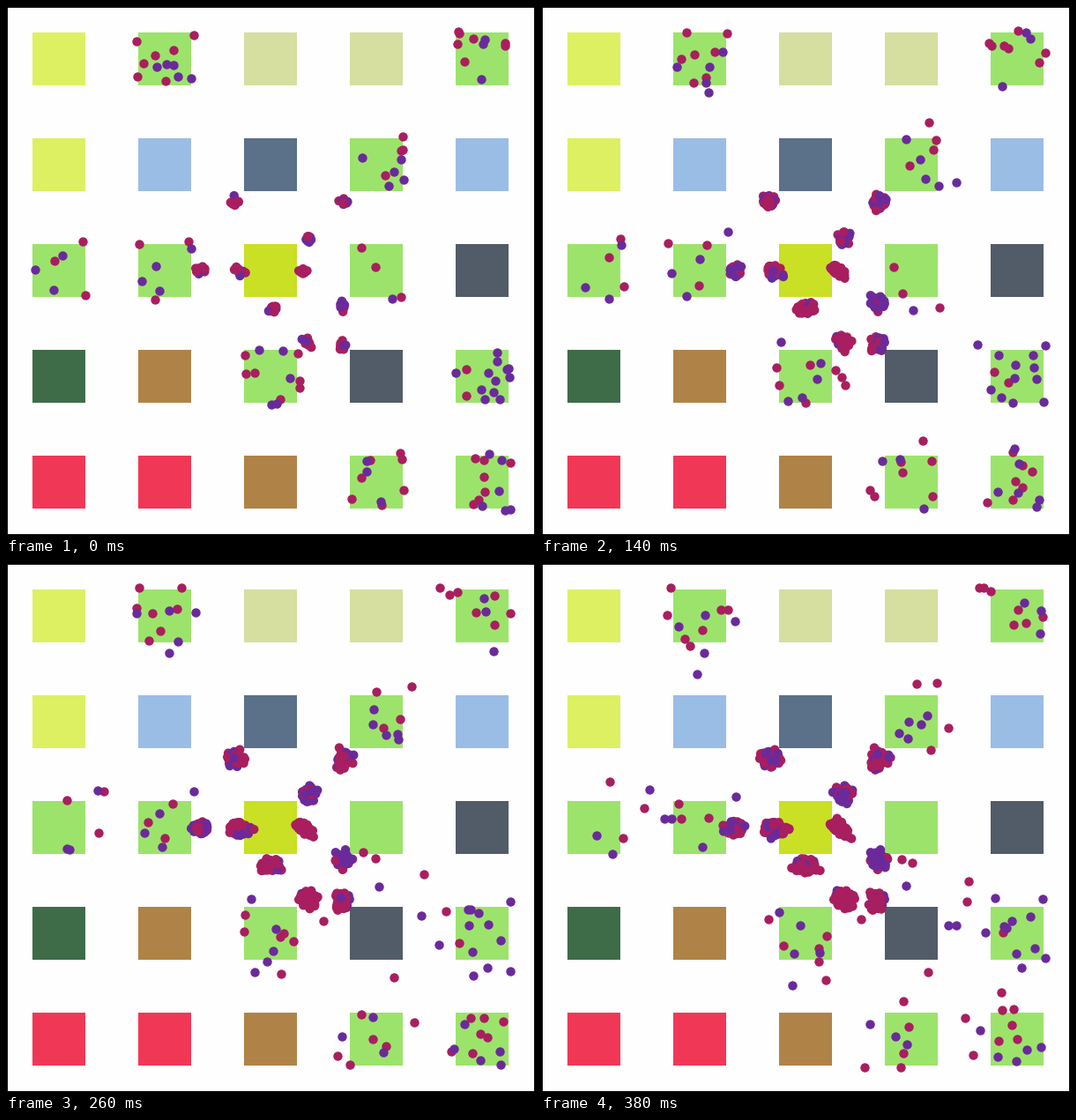
Write a matplotlib script that moves like this. It is 600 by 600 pixels and loops after 0.4 s.

```python
import math
import random

import numpy as np
import matplotlib.pyplot as plt
from matplotlib.animation import FuncAnimation
from matplotlib.patches import Rectangle

SIZE, DPI = 600, 100
FRAMES, INTERVAL = 20, 20
CELL, TILE = 120, 60
LOW, HIGH = 28, 572          # walkers stay inside these bounds
RED, PURPLE = "#a91e5f", "#6b2a9b"
DOT = (10.4 * 72 / DPI) ** 2

TILES = {"L": "#ddf062", "G": "#9ce36b", "P": "#d6dea0", "B": "#9abde6",
         "S": "#5b7089", "Y": "#c9e024", "D": "#525c68", "F": "#3f6c48",
         "N": "#af8347", "R": "#f03856"}
GRID = ["LGPPG", "LBSGB", "GGYGD", "FNGDG", "RRNGG"]

# column, row, red walkers, purple walkers, drift over one loop
HOMES = [(1, 0, 7, 5, -10, 12), (4, 0, 7, 3, -5, 10), (3, 1, 4, 5, 2, 0),
         (0, 2, 3, 3, 25, -8), (1, 2, 3, 4, -10, 8), (3, 2, 3, 1, 0, 15),
         (2, 3, 7, 5, 0, 10), (4, 3, 2, 12, -22, -18), (3, 4, 7, 3, 0, -5),
         (4, 4, 7, 6, -28, -15)]

# centre, half axes, tilt in degrees, share of purple
CLUMPS = [(259, 219, 27, 14, 0, 0.45), (381, 221, 22, 16, 45, 0.35),
          (343, 261, 23, 14, 90, 0.55), (338, 301, 23, 8, 40, 0.15),
          (263, 301, 27, 13, 10, 0.5), (219, 300, 19, 13, 0, 0.45),
          (300, 343, 20, 17, 0, 0.3), (341, 380, 23, 13, 40, 0.3),
          (379, 382, 20, 16, 0, 0.35), (381, 337, 22, 14, 75, 0.95)]

rng = np.random.default_rng(11)
rand = random.Random(4)


def walk(col, row, drift):
    """A random walk that leaves its home tile with a slow drift."""
    centre = np.array([col, row]) * CELL + CELL / 2
    steps = rng.normal(np.array(drift) / FRAMES, 5, (FRAMES, 2))
    steps[0] = rng.uniform(-34, 34, 2)
    return np.clip(np.round(centre + steps.cumsum(0)), LOW, HIGH)


def grow(cx, cy, a, b, tilt, purple):
    """Dots that stick to earlier dots inside a lobed, widening ellipse."""
    cos, sin = math.cos(math.radians(tilt)), math.sin(math.radians(tilt))
    phase = rand.uniform(0, math.tau)
    local = [(0, 0, PURPLE if purple > 0.5 else RED)]
    births = [0]
    for frame in range(FRAMES):
        reach = 0.45 + 0.55 * min(1, frame / 13)
        quota = 5 if frame else 9
        for _ in range(60):
            if not quota:
                break
            px, py, color = rand.choice(local)
            angle, step = rand.uniform(0, math.tau), rand.uniform(3, 6)
            x, y = px + step * math.cos(angle), py + step * math.sin(angle)
            lobe = 0.87 + 0.18 * math.cos(3 * math.atan2(y / b, x / a) + phase)
            if math.hypot(x / a, y / b) > reach * lobe:
                continue
            if not frame or rand.random() < 0.15:
                color = PURPLE if rand.random() < purple else RED
            local.append((x, y, color))
            births.append(frame)
            quota -= 1
    return [(t, cx + x * cos - y * sin, cy + x * sin + y * cos, c)
            for t, (x, y, c) in zip(births, local)]


paths, path_colors = [], []
for col, row, reds, purples, *drift in HOMES:
    for color in [RED] * reds + [PURPLE] * purples:
        paths.append(walk(col, row, drift))
        path_colors.append(color)
paths = np.array(paths)

stuck = sorted((d for clump in CLUMPS for d in grow(*clump)), key=lambda d: d[0])
births = np.array([d[0] for d in stuck])
stuck_xy = np.array([d[1:3] for d in stuck])
stuck_colors = [d[3] for d in stuck]

fig = plt.figure(figsize=(SIZE / DPI, SIZE / DPI), dpi=DPI, facecolor="#fefefe")
ax = fig.add_axes([0, 0, 1, 1])
ax.set_xlim(0, SIZE)
ax.set_ylim(SIZE, 0)
ax.axis("off")

margin = (CELL - TILE) / 2
for row, line in enumerate(GRID):
    for col, key in enumerate(line):
        ax.add_patch(Rectangle((margin + CELL * col, margin + CELL * row), TILE, TILE,
                               color=TILES[key], lw=0))
# The right and bottom edges are half cut off by the stage
ax.add_patch(Rectangle((1, 1), SIZE - 1, SIZE - 1, fill=False, ec="black",
                       lw=2 * 72 / DPI, snap=False, zorder=5))

dots = ax.scatter([], [], s=DOT, linewidths=0, zorder=3)


def draw(frame):
    n = np.count_nonzero(births <= frame)
    dots.set_offsets(np.vstack([stuck_xy[:n], paths[:, frame]]) + 0.5)
    dots.set_facecolors(stuck_colors[:n] + path_colors)
    return dots,


anim = FuncAnimation(fig, draw, frames=FRAMES, interval=INTERVAL, repeat=True,
                     repeat_delay=0, blit=False)
plt.show()
```
